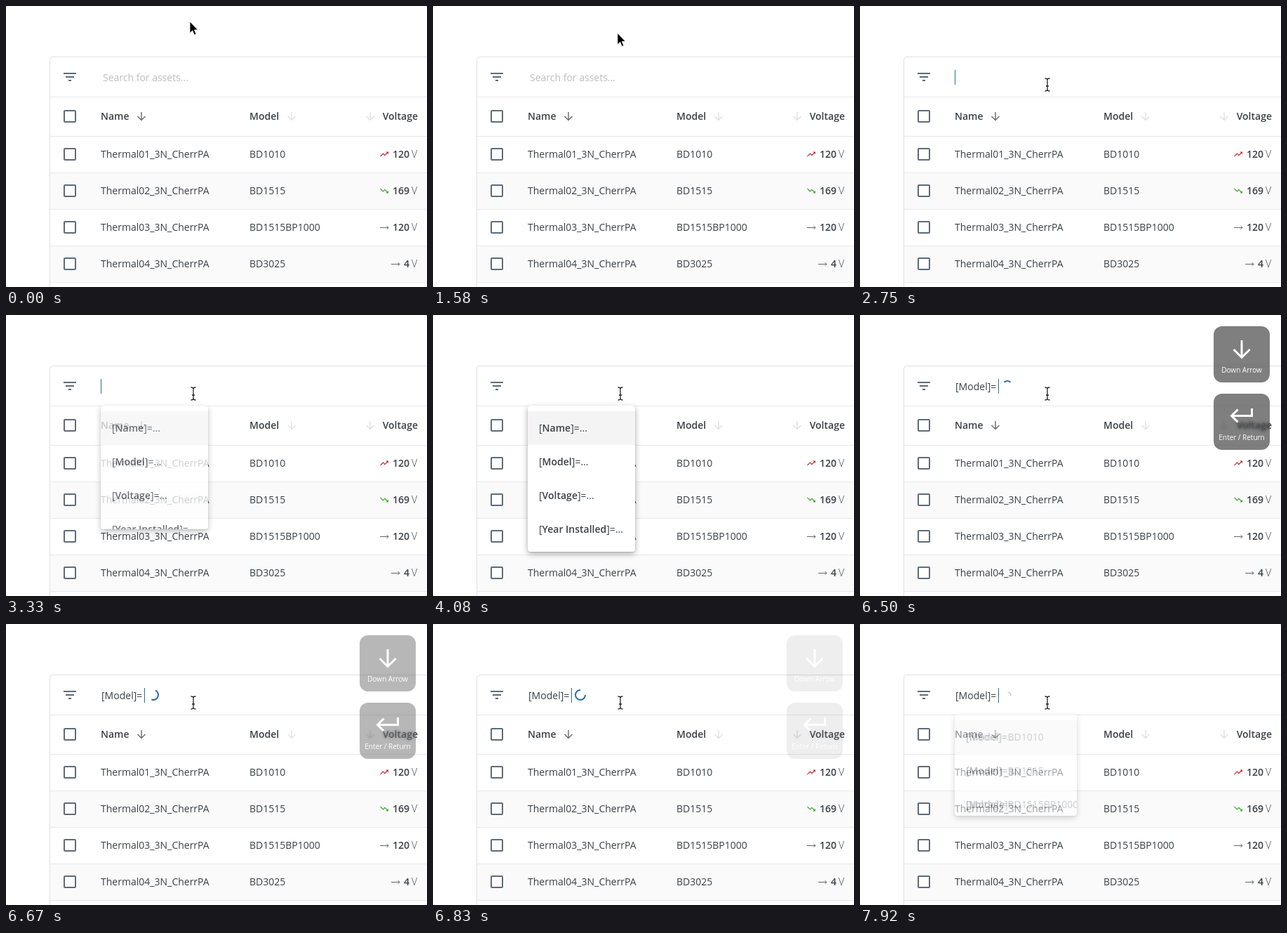
An HTML page for the animation above (8000 ms loop, 600x400 px).

```html
<!DOCTYPE html>
<html lang="en">
<head>
<meta charset="utf-8">
<title>Asset table search</title>
<style>
  html, body { margin: 0; width: 100%; height: 100%; overflow: hidden; background: #e4e4e4; }
  #stage {
    position: relative; width: 600px; height: 400px; overflow: hidden;
    background: #fff; border-radius: 4px;
    font: 14px "Open Sans", "Noto Sans", sans-serif; color: #3b4046;
  }
  #stage > * { position: absolute; }
  #base { left: 0; top: 0; }
  text { fill: #3b4046; }
  .bold, b { font-weight: 600; }
  .end { text-anchor: end; }
  .line { fill: none; stroke-linecap: butt; }
  .menu {
    left: 135px; top: 129px; overflow: hidden; background: #fff; border-radius: 4px;
    box-shadow: 0 3px 8px rgba(0, 0, 0, .32), 0 1px 2px rgba(0, 0, 0, .12);
  }
  .menu ul { position: absolute; left: 0; top: 8px; width: 100%; margin: 0; padding: 0; list-style: none; }
  .menu li { height: 48px; line-height: 48px; padding-left: 16px; white-space: nowrap; }
  .menu li:first-child { background: #f4f4f4; }
  .key {
    left: 504px; width: 80px; height: 80px; border-radius: 12px;
    background: rgba(0, 0, 0, .56);
    -webkit-backdrop-filter: blur(2px); backdrop-filter: blur(2px);
  }
  .key text { fill: #fff; font-size: 10px; text-anchor: middle; }
  .key path { fill: none; stroke: #fff; stroke-width: 3; }
</style>
</head>
<body>
<div id="stage">
  <svg id="base" width="600" height="400">
    <g id="table"></g>
    <text id="hint" x="138" y="107" style="fill:#bdbdbd">Search for assets...</text>
    <text id="query" x="136" y="107">[Model]=</text>
    <rect id="caret" y="91" width="1" height="21" fill="#23767c"/>
    <path id="spinner" class="line" stroke-width="2"/>
    <path id="arrow" d="M0 0V16.5L3.8 13L6.4 19.2L9 18.1L6.4 12H11.4Z" fill="#000" stroke="#fff" stroke-width=".8"/>
    <g id="beam" class="line">
      <path d="M-3.5 -9Q0 -9 0 -7Q0 -9 3.5 -9M0 -8V8M-3.5 9Q0 9 0 7Q0 9 3.5 9M-2 2H2" stroke="#fff" stroke-width="3"/>
      <path d="M-3.5 -9Q0 -9 0 -7Q0 -9 3.5 -9M0 -8V8M-3.5 9Q0 9 0 7Q0 9 3.5 9M-2 2H2" stroke="#222" stroke-width="1.3"/>
    </g>
  </svg>
  <div class="menu" id="menu"><ul id="fields"></ul><ul id="models"></ul></div>
  <div class="key" id="down" style="top:16px">
    <svg width="80" height="80"><path d="M40 20V44M28.5 33L40 44.5L51.5 33"/><text x="40" y="66">Down Arrow</text></svg>
  </div>
  <div class="key" id="enter" style="top:112px">
    <svg width="80" height="80"><path d="M54.500 21V31.500H26M34.500 22.500L25.500 31.500L34.500 40.500"/><text x="40" y="66">Enter / Return</text></svg>
  </div>
</div>
<script>
const $ = id => document.getElementById(id);
const LOOP = 8000, STEP = 1000 / 12;

// Static table
const text = (x, y, s, cls = '') => `<text x="${x}" y="${y}" class="${cls}">${s}</text>`;
const rect = (x, y, w, h, fill) => `<rect x="${x}" y="${y}" width="${w}" height="${h}" fill="${fill}"/>`;
const line = (d, color, width) => `<path class="line" d="${d}" stroke="${color}" stroke-width="${width}"/>`;
const box = y => `<rect x="83" y="${y - 8}" width="16" height="16" rx="1" fill="#fff" stroke="#5f6b78" stroke-width="2"/>`;
const sortArrow = (x, color) => line(`M${x} 151V162M${x - 5.5} 157L${x} 162.500L${x + 5.5} 157`, color, 1.5);

function trend(kind, x, y) {
  if (!kind) return line(`M${x - 6} ${y + .5}H${x + 6}M${x + 3.5} ${y - 2}L${x + 6} ${y + .5}L${x + 3.5} ${y + 3}`, '#666', 1);
  const color = kind > 0 ? '#c62f35' : '#43a832';
  return `<path transform="translate(${x} ${y}) scale(.6 ${.6 * kind}) translate(-12 -12)" fill="${color}"
    d="M16 6l2.290 2.290-4.880 4.880-4-4L2 16.590 3.410 18l6-6 4 4 6.300-6.290L22 12V6z"/>`;
}

const rows = [['BD1010', 120, 1], ['BD1515', 169, -1], ['BD1515BP1000', 120, 0], ['BD3025', 4, 0]];

function buildTable() {
  let s = rect(63, 237, 540, 52, '#fafafa') + rect(63, 341, 540, 52, '#fafafa');
  for (const y of [129, 185, 237, 289, 341, 393]) s += rect(63, y, 540, 1, '#e9e9e9');
  s += '<rect x="62.500" y="72.500" width="560" height="400" rx="4" fill="none" stroke="#e0e0e0"/>';
  s += line('M82 96H100M85 101H97M89 106H93', '#5f6b78', 2);
  s += box(157) + text(135, 162, 'Name', 'bold') + text(347, 162, 'Model', 'bold') + text(587, 162, 'Voltage', 'bold end');
  s += sortArrow(193, '#707070') + sortArrow(407, '#e2e2e2') + sortArrow(519, '#e2e2e2');
  rows.forEach(([model, volts, kind], i) => {
    const y = 211 + 52 * i;
    s += box(y) + text(135, y + 5, `Thermal0${i + 1}_3N_CherrPA`) + text(347, y + 5, model);
    s += trend(kind, volts < 10 ? 555 : 539, y);
    s += text(575, y + 5, volts, 'bold end');
    s += `<text x="578" y="${y + 5}" font-weight="300">V</text>`;
  });
  $('table').innerHTML = s;
}

const item = (name, value) => `<li>[<b>${name}</b>]=${value}</li>`;
buildTable();
$('fields').innerHTML = ['Name', 'Model', 'Voltage', 'Year Installed'].map(n => item(n, '...')).join('');
$('models').innerHTML = rows.map(r => item('Model', r[0])).join('');

// Motion
const clamp = v => Math.max(0, Math.min(1, v));
const mix = (a, b, p) => a + (b - a) * p;
const ramp = (t, a, b) => clamp((t - a) / (b - a));
const smooth = p => p * p * (3 - 2 * p);
const show = (el, on) => { el.style.display = on ? '' : 'none'; };

function drawPointer(t) {
  const p = smooth(ramp(t, 1333, 2250));
  const x = mix(262, 267, p), y = mix(22, 112, p), over = y > 73;
  show($('arrow'), !over);
  show($('beam'), over);
  $(over ? 'beam' : 'arrow').setAttribute('transform', `translate(${x} ${y})`);
}

function drawInput(t) {
  const typed = t >= 5250;
  show($('hint'), t < 2750);
  show($('query'), typed);
  show($('caret'), typed || (t >= 2750 && t < 3750) || (t >= 4416 && t < 4916));
  $('caret').setAttribute('x', typed ? 197 : 135);
}

function drawSpinner(t) {
  const el = $('spinner');
  show(el, t >= 5250);
  if (t < 5250) return;
  const u = (t - 5250) % 1250 / 1250, grow = ramp(u, 0, .264), rest = ramp(u, .264, 1);
  let from = mix(mix(-130, 0, grow), 230, rest);
  let to = mix(mix(-50, 270, grow), 310, rest);
  const out = ramp(t, 7667, 7916);
  if (out) {
    from = mix(-150, -82, out);
    to = mix(-50, 5, out);
  }
  const r = mix(7, 5, out), cx = 210, cy = mix(101, 102, out);
  const at = deg => {
    const a = deg * Math.PI / 180;
    return `${cx + r * Math.cos(a)} ${cy + r * Math.sin(a)}`;
  };
  el.setAttribute('d', `M${at(from)}A${r} ${r} 0 ${to - from > 180 ? 1 : 0} 1 ${at(to)}`);
  el.setAttribute('stroke', out ? '#6c7c88' : '#2c6d9f');
  el.setAttribute('stroke-width', mix(2, 1.3, out));
  el.style.opacity = mix(1, .5, out);
}

function drawMenu(t) {
  const first = t < 5250;
  const q = ramp(t, 3167, 3500);
  const p = first ? q * (2 - q) : .5 * ramp(t, 7667, 7916);
  const s = $('menu').style;
  show($('menu'), p > 0);
  s.opacity = p;
  s.width = (first ? 153 : 153 + 42 * p) + 'px';
  s.height = 80 + 128 * p + 'px';
  $('fields').style.opacity = first ? 1 : 1 - p;
  $('models').style.opacity = first ? 0 : p;
}

function drawKeys(t) {
  const alpha = 1 - ramp(t, 6458, 6883);
  for (const [id, start] of [['down', 4416], ['enter', 5250]]) {
    show($(id), t >= start && alpha > 0);
    $(id).style.opacity = alpha;
  }
}

function frame() {
  const now = performance.now() % LOOP;
  const t = Math.round(Math.floor((now + 4) / STEP) % 96 * STEP);
  drawPointer(t);
  drawInput(t);
  drawSpinner(t);
  drawMenu(t);
  drawKeys(t);
  requestAnimationFrame(frame);
}
frame();
</script>
</body>
</html>
```
